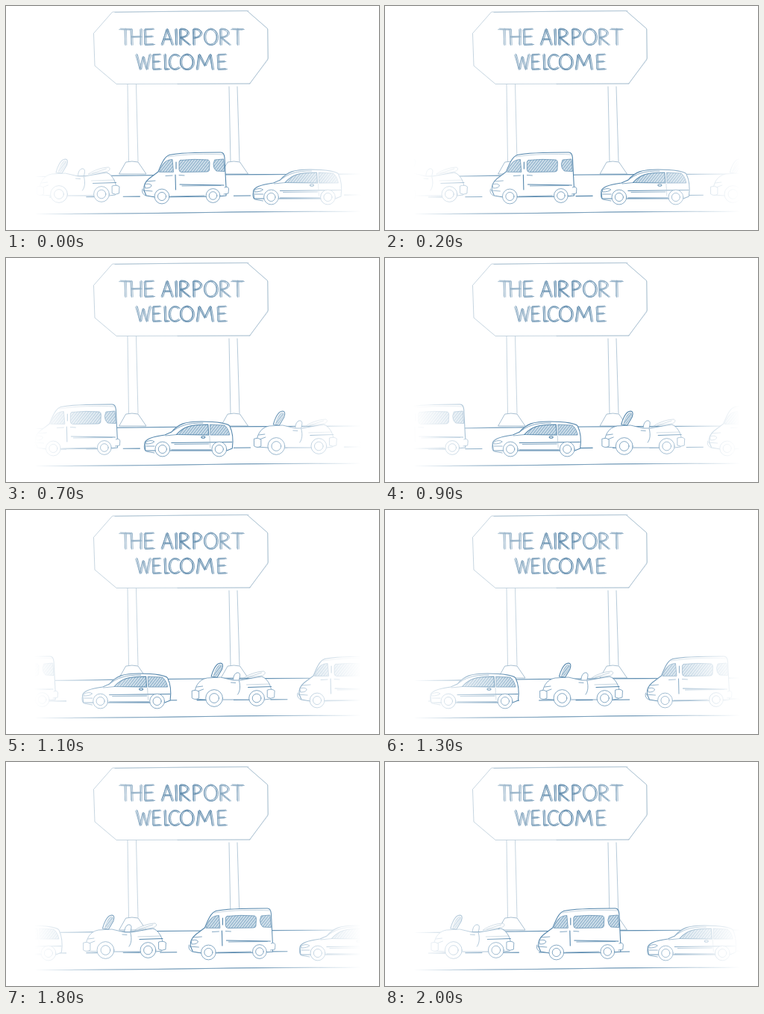
An HTML page for the animation above (2.1 s loop, 500x300 px).

```html
<!DOCTYPE html>
<html lang="en">
<head>
<meta charset="utf-8">
<title>The airport welcome</title>
<style>
  html, body { margin: 0; width: 100%; height: 100%; overflow: hidden; background: #fff; }
  svg { display: block; width: 500px; height: 300px; }
  path, ellipse, circle, line { fill: none; stroke: #6793b5; stroke-width: .8; stroke-linecap: round; stroke-linejoin: round; }
  .body { fill: #fff; }
  .bold { stroke: #5486ac; stroke-width: 1.1; }
  .soft { stroke: #9fb9cc; stroke-width: .6; }
  .glass { fill: url(#hatch); }
  .wash { stroke: #d3e1eb; stroke-width: 2.2; }
  .ink { stroke: #4b7ba0; stroke-width: .75; }
</style>
</head>
<body>
<svg viewBox="0 0 500 300" role="img" aria-label="The airport welcome">
  <defs>
    <pattern id="hatch" width="2.9" height="8" patternUnits="userSpaceOnUse" patternTransform="rotate(38)">
      <rect width="2.9" height="8" fill="#e6eff5"/>
      <line x1="1" x2="1" y2="8" style="stroke:#6997b9;stroke-width:1.1"/>
    </pattern>
    <linearGradient id="edges" gradientUnits="userSpaceOnUse" x1="38" x2="476" y1="0" y2="0">
      <stop offset="0" stop-color="#fff" stop-opacity="0"/>
      <stop offset=".08" stop-color="#fff" stop-opacity=".25"/>
      <stop offset=".2" stop-color="#fff" stop-opacity=".64"/>
      <stop offset=".33" stop-color="#fff"/>
      <stop offset=".68" stop-color="#fff"/>
      <stop offset=".81" stop-color="#fff" stop-opacity=".65"/>
      <stop offset=".9" stop-color="#fff" stop-opacity=".3"/>
      <stop offset="1" stop-color="#fff" stop-opacity="0"/>
    </linearGradient>
    <mask id="fade" maskUnits="userSpaceOnUse" x="0" y="180" width="500" height="120">
      <rect y="180" width="500" height="120" fill="url(#edges)"/>
    </mask>
  </defs>

  <g id="sign">
    <path class="soft" d="M143 8L323 6.500L350.500 30L351.500 70L327 104L148 104.500L119 80L117.500 37Z"/>
    <path class="soft" d="M146 8.500L240 7L325 6.500M324 7L351 31L351 72L326.500 104M327 104L230 104.500"/>
    <path class="soft" d="M163 105L164.500 208M174.500 105L177 208"/>
    <path class="soft" d="M299 108L301 208M310 108L313 208" style="stroke:#84a5be"/>
    <path class="body" id="foot" d="M161 209Q169 207 177 209L188 225L152 225Z" style="stroke:#83a4bd;stroke-width:.7"/>
    <use href="#foot" x="136.500"/>
  </g>
  <g id="lettering"></g>

  <g mask="url(#fade)">
    <path class="bold" d="M40 228.500C130 228 200 226 270 226S400 225 475 225"/>
    <path class="bold" d="M40 278.500C150 278.500 230 277 300 276S420 275.500 475 275"/>
    <path class="soft" d="M90 278C200 278 320 275.500 420 275.500"/>
    <line x1="58" y1="256" x2="476" y2="253" class="bold" style="stroke-dasharray:23 26.400;stroke-linecap:butt"/>
    <g id="traffic">
      <g id="cars">
        <g id="convertible" transform="translate(-166.500)">
          <path class="body" d="M211 248C211 238 216 227 228 225L246 224L263 228L272 228L301 223C308 225 313 234 314 241L313 253L305 254L226 254L212 253Z"/>
          <path class="body" d="M263 227C263 222 266 217 270 218C273 219 272 223 271 227"/>
          <path class="body soft" d="M277 225C285 219 298 216 304 216C308 218 304 222 300 222Z"/>
          <path class="body bold" d="M233.500 223C235 217 239 207 244 205.500C249 204 250 208 248 213L241.500 224Z"/>
          <path class="glass soft" d="M236.500 222C238 216 241 209 245 207C248 207 248 210 246.500 213L240.500 222Z"/>
          <path class="bold" d="M283 237.500L314 236.500"/>
          <path class="soft" d="M281 234L312 233M282 224L301 218"/>
          <path d="M271 229C273 237 272 243 269 247M260 231L266 231.500M214 237L222 236M215 243L223 240"/>
          <path class="body" d="M208 242Q213 240 217 243L217 252Q212 255 208 252Z"/>
          <path class="body" d="M309 241Q315 239 318.500 242L318 251Q313 253.500 309 251Z"/>
          <g class="wheels" data-wheels="237.500,252,12 294.500,252,11"></g>
        </g>
        <g id="van">
          <path class="body bold" d="M188 254L185 247C184 240 187 235 192 231L204 222C208 212 212 202 219 199.500C232 196.500 270 196 288 196C291 196 292.500 198 293 203L295 243L295 254L285 255L200 256Z"/>
          <path class="soft" d="M217 202C240 198 270 198 291 199"/>
          <path class="glass" d="M205.500 222C209 212 213 206 223 205.500L224.500 222Z"/>
          <path class="glass" d="M234 206.500Q253 204.500 271 206Q273 207 273 210L272.500 220Q272 222 269 222L235 222.500Q232 222 232 219L232 209Q232 207 234 206.500Z"/>
          <path class="glass" d="M280 206L291.500 205L293 221.500L282 221Q278 218 278 212Z"/>
          <path class="bold" d="M228 209L228 218M227 226L227.500 246M233 239L292 240"/>
          <path d="M214 227.500L223 227M232 226.500L239 227M236 241L288 240.500M221 255L266 254M188 235L200 234"/>
          <path class="body" d="M186 239Q192 237 195 240Q195 244 187 244Z"/>
          <path d="M183 245Q181 251 187 254M184 247L196 248"/>
          <path class="body" d="M293 243Q298 241 298.500 245L298 251L292 252"/>
          <g class="wheels" data-wheels="209,255,10.500 277.500,254,10"></g>
        </g>
        <g id="hatchback" transform="translate(145.500)">
          <path class="body bold" d="M187 258L186 248C187 242 198 239 213 237L222 233C232 222 240 219 262 219C285 219 298 222 300 225C304 233 305 244 303.500 255L296 258L220 258Z"/>
          <path d="M221 234C233 224 244 221 264 221M214 238L229 236.500"/>
          <path class="glass bold" d="M228.500 236.500C238 226 247 223 271 223L272 237Z"/>
          <path class="glass" d="M274 223L293 224C297 227 299 232 300 237L274.500 237Z"/>
          <path class="bold" d="M222 247.500L303 246.500M222 257L275 257"/>
          <path d="M226 249.500L272 249M188 252L199 252"/>
          <path class="soft" d="M273 238L274 254"/>
          <ellipse class="body bold" cx="264.500" cy="240" rx="2.500" ry="1.200"/>
          <path class="body" d="M188 246Q195 243 199 246Q196 249 188 249Z"/>
          <path d="M186 249Q184 256 188 259L199 261"/>
          <g class="wheels" data-wheels="210,256,10.500 286,256,10.500"></g>
        </g>
      </g>
      <use href="#cars" x="437"/>
    </g>
  </g>
</svg>
<script>
const SVG = 'http://www.w3.org/2000/svg';
const add = (parent, tag, attrs) => {
  const node = parent.appendChild(document.createElementNS(SVG, tag));
  for (const key in attrs) node.setAttribute(key, attrs[key]);
  return node;
};

// Pen strokes on a unit square, placed by left edge and width.
const strokes = {
  T: 'M0 0L1 .02M.5 0L.5 1',
  H: 'M0 0L.04 1M1 0L.96 1M0 .5L1 .48',
  E: 'M.95 0L.03 .02L.05 1L1 .97M.05 .49L.85 .47',
  A: 'M0 1L.5 0L1 1M.2 .65L.8 .65',
  I: 'M.5 0L.5 1',
  R: 'M.05 1L.05 0C1.1 -.05 1.1 .52 .08 .53L1 1',
  P: 'M.05 1L.05 0C1.15 -.05 1.15 .55 .08 .56',
  O: 'M.5 0C-.16 0 -.16 1 .5 1S1.16 0 .5 0',
  W: 'M0 0L.27 1L.5 .15L.75 1L1 0',
  L: 'M.2 0L.2 1L1 .97',
  C: 'M1 .12C.5 -.15 0 .1 0 .52S.5 1.15 1 .88',
  M: 'M0 1L.15 0L.5 .75L.85 0L1 1'
};
const lettering = document.getElementById('lettering');

// Each letter is gone over three times at slightly different slants.
function write(text, places, top, height) {
  [...text].forEach((letter, i) => {
    const [left, width] = places[i];
    const group = add(lettering, 'g', { opacity: 1 - Math.abs(left - 237) / 190 });
    const pen = (cls, dx, dy, slant) => add(group, 'path', {
      class: cls, d: strokes[letter], 'vector-effect': 'non-scaling-stroke',
      transform: `translate(${left + dx} ${top + dy}) skewX(${slant}) scale(${width} ${height})`
    });
    pen('wash', 0, 0, 0);
    pen('ink', -1.4, .6, 4);
    pen('ink', .2, -.9, -3);
    pen('ink', 1.4, .1, 1);
  });
}
write('THEAIRPORT', [[153, 14], [168, 13], [186, 12], [209, 14], [225, 6], [233, 13],
  [251, 12], [266, 17], [287, 13], [303, 15]], 31, 21);
write('WELCOME', [[175, 18], [197, 10], [212, 6], [219, 13], [234, 17], [256, 21], [284, 11]], 65, 20);

for (const group of document.querySelectorAll('.wheels')) {
  for (const wheel of group.dataset.wheels.split(' ')) {
    const [cx, cy, r] = wheel.split(',').map(Number);
    add(group, 'circle', { class: 'body', cx, cy, r: r - .6 });
    add(group, 'circle', { class: 'body', cx, cy, r: r * .53 });
  }
}

const LOOP = 2100, STEP = 100, SPAN = 437;
const traffic = document.getElementById('traffic');

function draw() {
  const step = Math.floor(performance.now() % LOOP / STEP);
  traffic.setAttribute('transform', `translate(${-SPAN * step * STEP / LOOP})`);
  requestAnimationFrame(draw);
}
draw();
</script>
</body>
</html>
```
